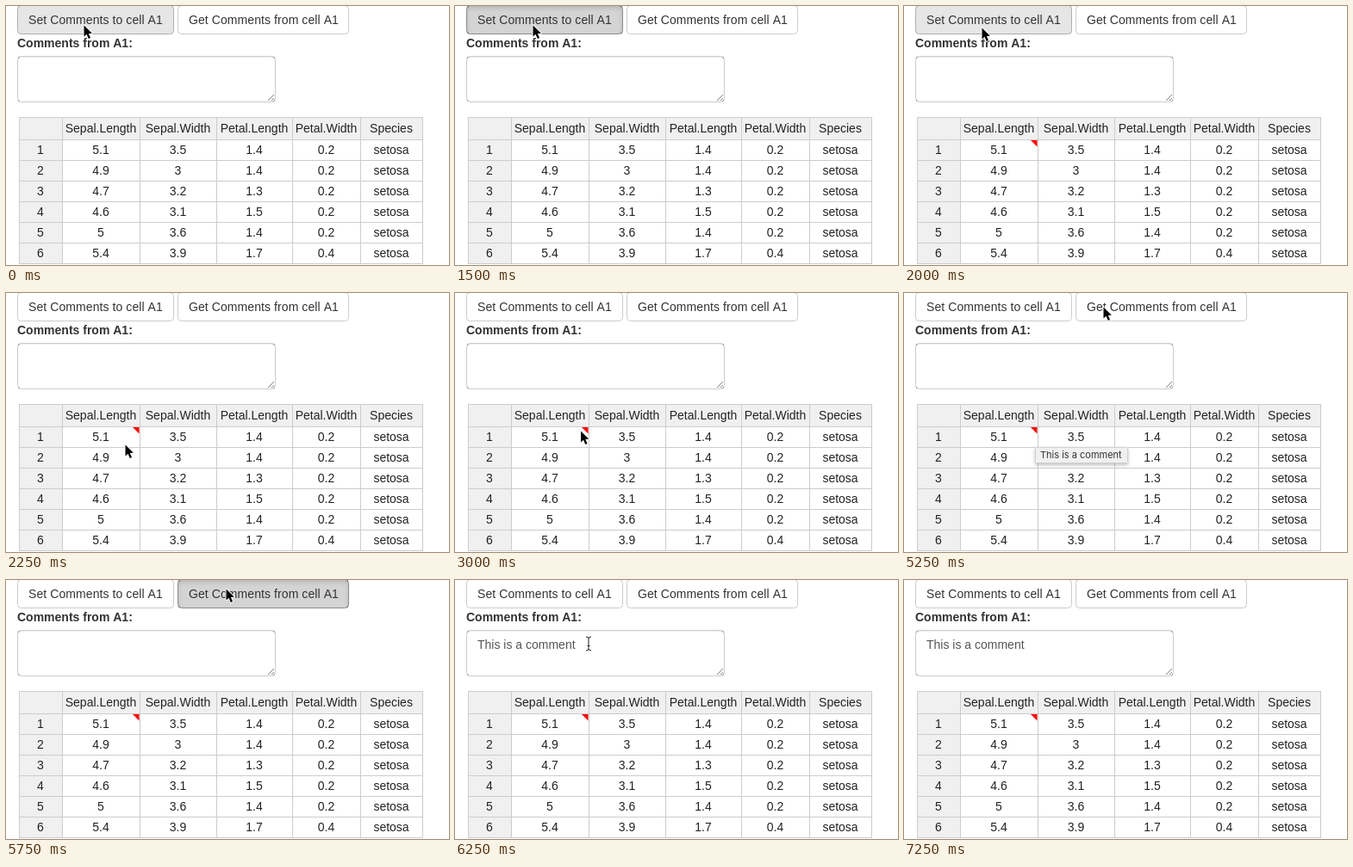
Write an HTML page with a canvas that moves like this. It is 514 px wide and 301 px high and loops after 8 s.

```html
<!DOCTYPE html>
<html lang="en">
<head>
<meta charset="utf-8">
<title>Cell comments</title>
<style>
html, body { margin: 0; width: 100%; height: 100%; overflow: hidden; background: #fff; }
canvas { display: block; width: 514px; height: 301px; }
</style>
</head>
<body>
<canvas id="stage"></canvas>
<script>
const W = 514, H = 301, LOOP = 8000;
const SANS = '"Liberation Sans", Arial, sans-serif';
const NOTE = 'This is a comment';
const canvas = document.getElementById('stage');
const ctx = canvas.getContext('2d');
const dpr = window.devicePixelRatio || 1;
canvas.width = Math.round(W * dpr);
canvas.height = Math.round(H * dpr);

const colX = [15, 65, 155, 244, 332, 411, 483];
const rowY = [129, 155, 179, 203, 227, 251, 275, 299];
const table = [
  ['', 'Sepal.Length', 'Sepal.Width', 'Petal.Length', 'Petal.Width', 'Species'],
  ['1', '5.1', '3.5', '1.4', '0.2', 'setosa'],
  ['2', '4.9', '3', '1.4', '0.2', 'setosa'],
  ['3', '4.7', '3.2', '1.3', '0.2', 'setosa'],
  ['4', '4.6', '3.1', '1.5', '0.2', 'setosa'],
  ['5', '5', '3.6', '1.4', '0.2', 'setosa'],
  ['6', '5.4', '3.9', '1.7', '0.4', 'setosa']
];

const looks = {
  normal: { fill: '#fff', edge: '#ccc' },
  hover: { fill: '#e6e6e6', edge: '#adadad' },
  pressed: { fill: '#d4d4d4', edge: '#8c8c8c' }
};

// Each track lists [start time, value...]; a value holds until the next entry.
const setTrack = [[0, 'hover'], [1500, 'pressed'], [1750, 'hover'], [2250, 'normal']];
const getTrack = [[0, 'normal'], [5500, 'hover'], [5750, 'pressed'], [6000, 'hover'], [6250, 'normal']];
const tipTrack = [[0, 0], [4250, 1], [5500, 0.4], [5750, 0]];
const pointerTrack = [
  [0, 'arrow', 90, 22], [2000, 'arrow', 90, 25], [2250, 'arrow', 138, 176],
  [2500, 'arrow', 150, 165], [2750, 'arrow', 146, 160], [3000, 'arrow', 145.5, 160],
  [3250, 'arrow', 146, 163], [3500, 'arrow', 146, 162], [5250, 'arrow', 231, 16],
  [5500, 'arrow', 254, 11], [5750, 'arrow', 255, 10], [6250, 'beam', 155, 74],
  [6500, 'beam', 91, 97], [6750, 'beam', 238, 73], [7000, 'arrow', 385, 44],
  [7250, 'none', 0, 0]
];

function at(track, t) {
  let found = track[0];
  for (const entry of track) if (entry[0] <= t) found = entry;
  return found.slice(1);
}

function text(str, x, y, { font = '14px ' + SANS, color = '#333', align = 'left', gap = 0 } = {}) {
  ctx.font = font;
  ctx.fillStyle = color;
  ctx.textAlign = align;
  ctx.letterSpacing = gap + 'px';
  ctx.fillText(str, x, y);
  ctx.letterSpacing = '0px';
}

function box(x, y, w, h, r, fill, edge) {
  ctx.beginPath();
  ctx.roundRect(x + 0.5, y + 0.5, w - 1, h - 1, r);
  ctx.fillStyle = fill;
  ctx.fill();
  ctx.strokeStyle = edge;
  ctx.lineWidth = 1;
  ctx.stroke();
}

function line(x1, y1, x2, y2) {
  ctx.beginPath();
  ctx.moveTo(x1, y1);
  ctx.lineTo(x2, y2);
  ctx.stroke();
}

function polygon(points) {
  ctx.beginPath();
  points.forEach(([x, y]) => ctx.lineTo(x, y));
  ctx.closePath();
}

function insetShadow(x, y, w, h, dy, blur, alpha) {
  ctx.save();
  ctx.beginPath();
  ctx.roundRect(x + 1, y + 1, w - 2, h - 2, 3);
  ctx.clip();
  ctx.shadowColor = `rgba(0,0,0,${alpha})`;
  ctx.shadowBlur = blur * dpr;
  ctx.shadowOffsetY = dy * dpr;
  ctx.beginPath();
  ctx.rect(x - 30, y - 30, w + 60, h + 60);
  ctx.roundRect(x + 1, y + 1, w - 2, h - 2, 3);
  ctx.fillStyle = '#000';
  ctx.fill('evenodd');
  ctx.restore();
}

function button(x, w, label, state) {
  const { fill, edge } = looks[state];
  box(x, -1, w, 34, 4, fill, edge);
  if (state === 'pressed') insetShadow(x, -1, w, 34, 3, 5, 0.125);
  text(label, x + 13, 21, { gap: 0.08 });
}

function textArea(value) {
  box(13, 58, 300, 54, 4, '#fff', '#ccc');
  insetShadow(13, 58, 300, 54, 1, 1, 0.075);
  ctx.strokeStyle = '#777';
  ctx.lineWidth = 0.9;
  line(304, 110, 311, 103);
  line(308, 110, 311, 107);
  text(value, 26, 80, { color: '#555' });
}

function drawTable(marked) {
  const right = colX[6], bottom = rowY[7];
  ctx.fillStyle = '#f0f0f0';
  ctx.fillRect(colX[0], rowY[0], right - colX[0], rowY[1] - rowY[0]);
  ctx.fillRect(colX[0], rowY[0], colX[1] - colX[0], bottom - rowY[0]);
  ctx.fillStyle = '#ccc';
  for (const x of colX) ctx.fillRect(x, rowY[0], 1, bottom - rowY[0] + 1);
  for (const y of rowY) ctx.fillRect(colX[0], y, right - colX[0] + 1, 1);
  table.forEach((row, r) => row.forEach((cell, c) => {
    const mid = (colX[c] + colX[c + 1]) / 2;
    text(cell, mid, r ? rowY[r] + 17 : 147, { align: 'center', color: '#222' });
  }));
  if (marked) {
    polygon([[147, 156], [154.5, 156], [154.5, 163.5]]);
    ctx.fillStyle = '#f00';
    ctx.fill();
  }
}

function tooltip(alpha) {
  if (!alpha) return;
  ctx.save();
  ctx.globalAlpha = alpha;
  ctx.shadowColor = 'rgba(0,0,0,.25)';
  ctx.shadowBlur = 4 * dpr;
  ctx.shadowOffsetY = 1.5 * dpr;
  ctx.fillStyle = '#f0f0f0';
  ctx.fillRect(152, 179, 108, 19);
  ctx.shadowColor = 'transparent';
  box(152, 179, 108, 19, 1, '#f0f0f0', '#d0d0d0');
  text(NOTE, 158, 192, { font: '11px Inter, sans-serif', color: '#333' });
  ctx.restore();
}

function pointer(kind, x, y) {
  if (kind === 'none') return;
  ctx.save();
  ctx.translate(x, y);
  ctx.lineJoin = 'round';
  if (kind === 'arrow') {
    polygon([[0.5, 0.5], [0.5, 13.6], [3.5, 10.8], [5.8, 16], [8, 15], [5.8, 10], [9.8, 9.8]]);
    ctx.strokeStyle = '#fff';
    ctx.lineWidth = 1.8;
    ctx.stroke();
    ctx.fillStyle = '#000';
    ctx.fill();
  } else {
    for (const [color, width] of [['#fff', 2.6], ['#222', 1]]) {
      ctx.strokeStyle = color;
      ctx.lineWidth = width;
      ctx.beginPath();
      for (const s of [-1, 1]) {
        ctx.moveTo(-3, 8 * s);
        ctx.quadraticCurveTo(0, 8 * s, 0, 6 * s);
        ctx.quadraticCurveTo(0, 8 * s, 3, 8 * s);
      }
      ctx.moveTo(0, -6);
      ctx.lineTo(0, 6);
      ctx.moveTo(-1.5, 2.5);
      ctx.lineTo(1.5, 2.5);
      ctx.stroke();
    }
  }
  ctx.restore();
}

function draw(t) {
  ctx.setTransform(dpr, 0, 0, dpr, 0, 0);
  ctx.fillStyle = '#fff';
  ctx.fillRect(0, 0, W, H);
  button(13, 182, 'Set Comments to cell A1', at(setTrack, t)[0]);
  button(199, 199, 'Get Comments from cell A1', at(getTrack, t)[0]);
  text('Comments from A1:', 13, 48, { font: 'bold 14px ' + SANS });
  textArea(t >= 6000 ? NOTE : '');
  drawTable(t >= 1750);
  tooltip(at(tipTrack, t)[0]);
  pointer(...at(pointerTrack, t));
}

const start = performance.now();
function tick() {
  draw((performance.now() - start) % LOOP);
  requestAnimationFrame(tick);
}
tick();
</script>
</body>
</html>
```
